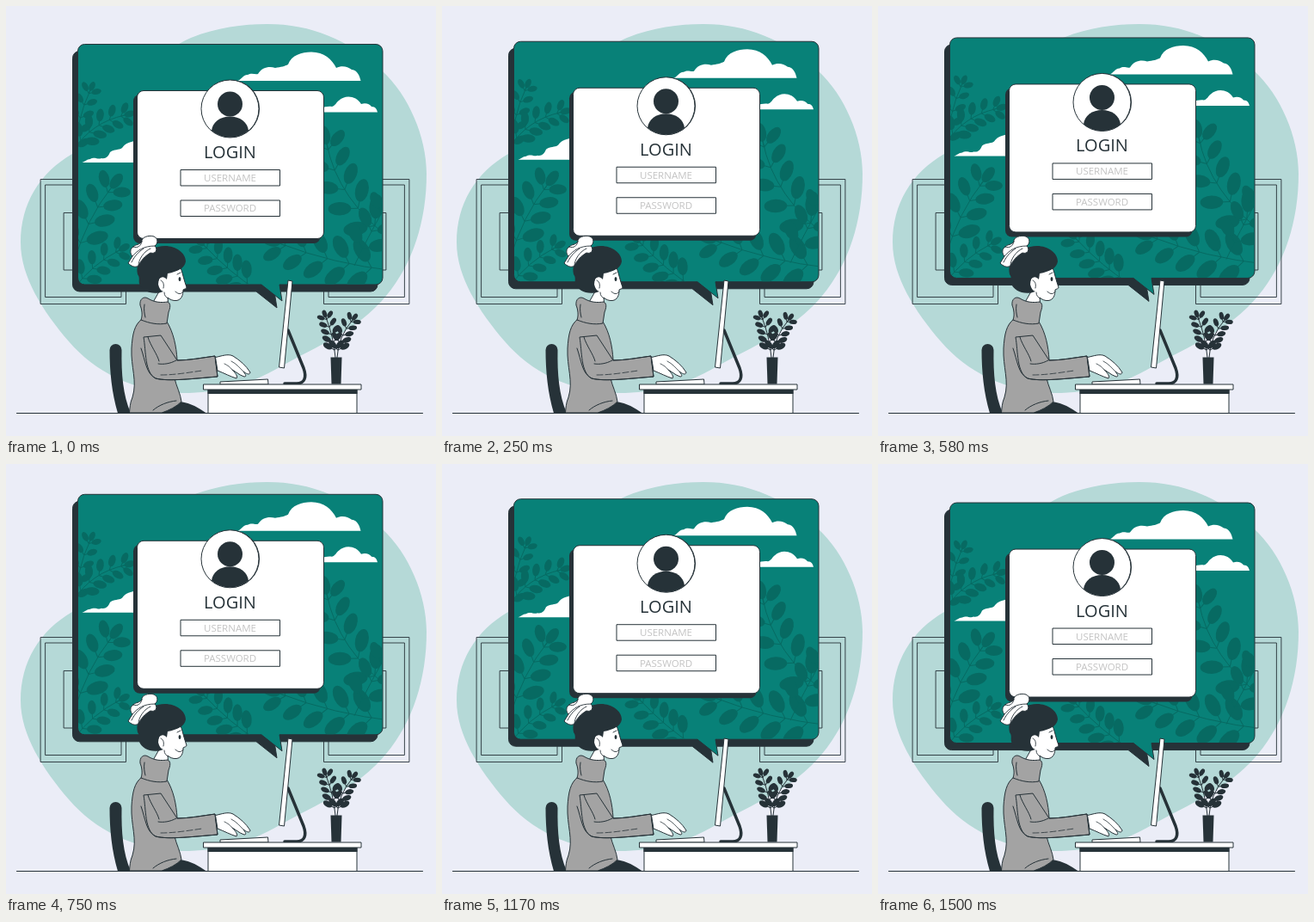
Animation of 500 by 500 pixels, one loop 1.54 s. Source, as an HTML page:

```html
<!DOCTYPE html>
<html lang="en">
<head>
<meta charset="utf-8">
<style>
html, body { margin: 0; height: 100%; overflow: hidden; background: #ebedf7; }
svg { display: block; width: 100vw; height: 100vh; }
.ink { fill: #263238; }
.line { fill: none; stroke: #263238; stroke-linecap: round; stroke-linejoin: round; }
.paper { fill: #fff; stroke: #263238; stroke-linejoin: round; }
.wool { fill: #a3a3a3; stroke: #263238; stroke-linejoin: round; }
text { font-family: "Open Sans", "Noto Sans", sans-serif; font-stretch: 62.5%; text-anchor: middle; }
.hint { font-size: 11.5px; fill: #c3c3c3; }
</style>
</head>
<body>
<svg viewBox="0 0 500 500">
  <defs>
    <path id="bubble" d="M91.5 44.5H430a8 8 0 0 1 8 8V316a8 8 0 0 1-8 8H318L321 343 297 324H91.5a8 8 0 0 1-8-8V52.5a8 8 0 0 1 8-8Z"/>
    <clipPath id="inside"><rect x="84" y="45" width="353.5" height="278.5" rx="8"/></clipPath>
    <g id="frame" class="line" stroke-width=".9">
      <path d="M40.5 201.5H139.5V346.500H40.5ZM46 208H134V338.500H46ZM67.500 240.500H113V307H67.500Z"/>
    </g>
  </defs>

  <path fill="#b5d9d7" d="M215 37C245 25 275 21 304 21C355 21 398 39 438 76C468 104 489 152 489 195C489 250 473 300 442 337C408 378 362 395 318 420C282 441 248 450 205 450C148 449 103 425 73 390C43 355 17 315 17 275C17 230 39 194 77 172C140 140 150 65 215 37Z"/>
  <use href="#frame"/>
  <use href="#frame" transform="matrix(-1 0 0 1 509 0)"/>

  <g id="panel">
    <use href="#bubble" class="ink" stroke="#263238" x="-6" y="8"/>
    <use href="#bubble" fill="#088178" stroke="#263238"/>
    <g clip-path="url(#inside)">
      <g id="foliage" fill="#076a62" stroke="#076a62"></g>
      <g fill="#fff">
        <path d="M269 87C274 86 275 80 281 80C286 77 289 80 293 79C298 71 306 70 313 72C320 71 324 70 328 68C332 57 344 53.500 355 53.500C370 53.500 379 62 384 72C390 69 397 70 402 74C409 75 411 81 412.500 87Z"/>
        <path d="M355 123.500C364 119 372 116 379 117C383 116 384 112 387 110C394 103 407 104 413 114C418 112 423 114 425 117C430 117 431 120 432 123.500Z"/>
        <path d="M88.500 182C92 181 94 178 98 178C103 175 107 179 111 177C116 178 119 175 121 170C126 166 131 168 135 165C139 159 145 158 153 156V182Z"/>
      </g>
    </g>
    <rect class="ink" x="148" y="103" width="217.500" height="173" rx="7.500"/>
    <rect class="paper" x="152.500" y="98.500" width="217" height="172" rx="7.500"/>
    <circle class="ink" cx="261.500" cy="119.500" r="33.500"/>
    <circle class="paper" cx="260.500" cy="119.500" r="33.500"/>
    <circle class="ink" cx="260.500" cy="114" r="14.500"/>
    <path class="ink" d="M239 145C240 135 249 128.500 260.500 128.500S281 135 282 145A33.500 33.500 0 0 1 239 145Z"/>
    <text x="260.500" y="177" font-size="20" fill="#263238">LOGIN</text>
    <path class="paper" d="M203 190.500H318.500V209H203ZM203 226H318.500V244.500H203Z"/>
    <text class="hint" x="260.500" y="204">USERNAME</text>
    <text class="hint" x="260.500" y="239.500">PASSWORD</text>
  </g>

  <path class="line" d="M12.500 473.500H484.500"/>
  <path class="ink" d="M120.500 400a7 7 0 0 1 14 0C134 428 136 452 145 473.500H130C123 450 120.500 425 120.500 400Z"/>
  <path class="ink" d="M180 473.500L203 460C215 462 224 467 233 473.500Z"/>

  <path class="paper" d="M181 310L203 304C206 313 207 319 210 327C210 329 207 329 206 330C206 336 204 342 198 342.500C194 343 190 341 188 339L189 351L169 348L178 332C175 325 177 315 181 310Z"/>
  <path class="ink" d="M153 312C150 297 160 283 177 280C194 276 209 286 209 297C208 305 199 309 188 311L187 318C182 312 176 317 177 324C178 328 180 331 183 332C170 337 158 331 155 323C154 319 156 316 153 312Z"/>
  <path class="line" d="M180 319C183 320 184 324 183 328M199 312l4-2M197 332C201 336 204 335 206 332M184 333C184 337 186 339 189 340" stroke-width=".9"/>
  <ellipse class="ink" cx="202" cy="317.500" rx="1.400" ry="2.500"/>
  <path class="paper" d="M148 280C151 277 155 278 158 274C157 269 166 266 172 268C177 270 177 276 173 279C177 283 174 289 168 287C161 291 157 296 154 302C150 305 145 302 142 299C144 296 145 294 147 291C144 288 144 282 148 280Z"/>
  <path class="line" d="M147 291C153 284 160 279 173 279M154 302C154 294 161 285 168 282M148 280C153 282 157 279 158 274M146 298C150 290 154 286 160 282" stroke-width=".9"/>

  <path class="wool" d="M158 364C149 371 147 382 146 398C145 420 153 436 147 455C144 462 144 468 143.500 473H181C190 470 198 466 204 460C203 451 198 442 196 433L199 411C198 396 195 380 187 367Z"/>
  <path class="wool" d="M156 348C155 341 160 337 165 340C173 345 181 345 188 344C192 346 191 351 189 356L187 369C177 371 167 369 157 365C159 359 158 353 156 348Z"/>
  <path class="wool" stroke="none" d="M160 385C163 402 161 426 174 433C188 437 220 433 246 431L243 407C228 409 213 412 199 412L180 383Z"/>
  <path class="line" d="M165 385C168 395 176 405 178 413M199 412C213 412 228 409 243 407L246 431C220 433 190 437 174 433C163 428 162 412 157 398M177 416C183 417 191 416 198 412M161 347C160 353 161 358 162 362M198 459C188 460 178 464 171 470"/>
  <path class="line" d="M180 429C197 429 213 426 228 424" stroke-dasharray="7 3" stroke-width=".8"/>
  <path class="paper" d="M243.500 408.500C251 407 258 404 264 407C272 412 279 418 284 426C283 430 279 427 276 425C279 429 280 431 277 431C271 429 267 425 263 423C267 427 270 431 268 433C261 431 254 427 246 424Z"/>
  <path class="line" d="M262 413C268 416 272 421 276 425M254 416C258 418 261 420 263 423" stroke-width=".8"/>

  <path class="line" d="M328 377L346 421C350 432 347 439 338 439H324" stroke-width="3.500"/>
  <path class="paper" d="M328 319L333 320 323.500 421 317.500 420Z"/>
  <path class="paper" d="M249 437L304.500 434 305 440H249Z"/>
  <path class="paper" d="M235 446H408V473.500H235Z"/>
  <path class="ink" d="M234.500 446H408.500V451H234.500Z"/>
  <path class="paper" d="M229.500 440H413V446H229.500Z"/>

  <path class="ink" d="M377.500 408.500H390.500L389.500 439.500H378.500Z"/>
  <g id="sprigs" class="ink" stroke="#263238"></g>
</svg>
<script>
const $ = id => document.getElementById(id);

// Quadratic stem with leaf pairs that shrink towards the tip.
function branch(x0, y0, cx, cy, x1, y1, pairs, size) {
  const leaf = (x, y, angle, s) =>
    `<ellipse cx="${s * .8}" rx="${s * .5}" ry="${s * .29}" stroke="none" transform="translate(${x} ${y}) rotate(${angle})"/>` +
    `<path d="M0 0H${s * .4}" transform="translate(${x} ${y}) rotate(${angle})"/>`;
  let out = `<path fill="none" d="M${x0} ${y0}Q${cx} ${cy} ${x1} ${y1}"/>`;
  for (let k = 1; k <= pairs; k++) {
    const t = k / (pairs + .3), u = 1 - t, s = size * (1.1 - .3 * t);
    const x = u * u * x0 + 2 * u * t * cx + t * t * x1;
    const y = u * u * y0 + 2 * u * t * cy + t * t * y1;
    const a = Math.atan2(u * (cy - y0) + t * (y1 - cy), u * (cx - x0) + t * (x1 - cx)) * 180 / Math.PI;
    out += leaf(x, y, a - 52, s) + leaf(x, y, a + 52, s);
    if (k === pairs) out += leaf(x, y, a, s);
  }
  return out;
}

$('foliage').innerHTML = [
  [78, 185, 82, 130, 98, 98, 5, 14],
  [78, 168, 100, 135, 138, 127, 5, 16],
  [78, 300, 95, 245, 122, 212, 4, 25],
  [78, 330, 100, 300, 132, 284, 4, 17],
  [292, 330, 262, 312, 230, 278, 5, 20],
  [452, 275, 385, 225, 373, 160, 5, 27],
  [452, 308, 380, 300, 318, 276, 5, 28],
  [405, 302, 420, 270, 440, 235, 3, 25]
].map(b => branch(...b)).join('');
$('sprigs').innerHTML = branch(383, 409, 381, 385, 372, 362, 5, 11) + branch(385, 409, 386, 385, 403, 365, 5, 11);

const LOOP = 1540, STEPS = 37, RISE = 10;
function draw() {
  const step = Math.floor(performance.now() % LOOP / LOOP * STEPS + .05) + 1;
  const phase = step / STEPS % 1;
  const y = .54 - RISE * (1 - Math.abs(1 - 2 * phase));
  $('panel').setAttribute('transform', `translate(0 ${y})`);
  requestAnimationFrame(draw);
}
draw();
</script>
</body>
</html>
```
